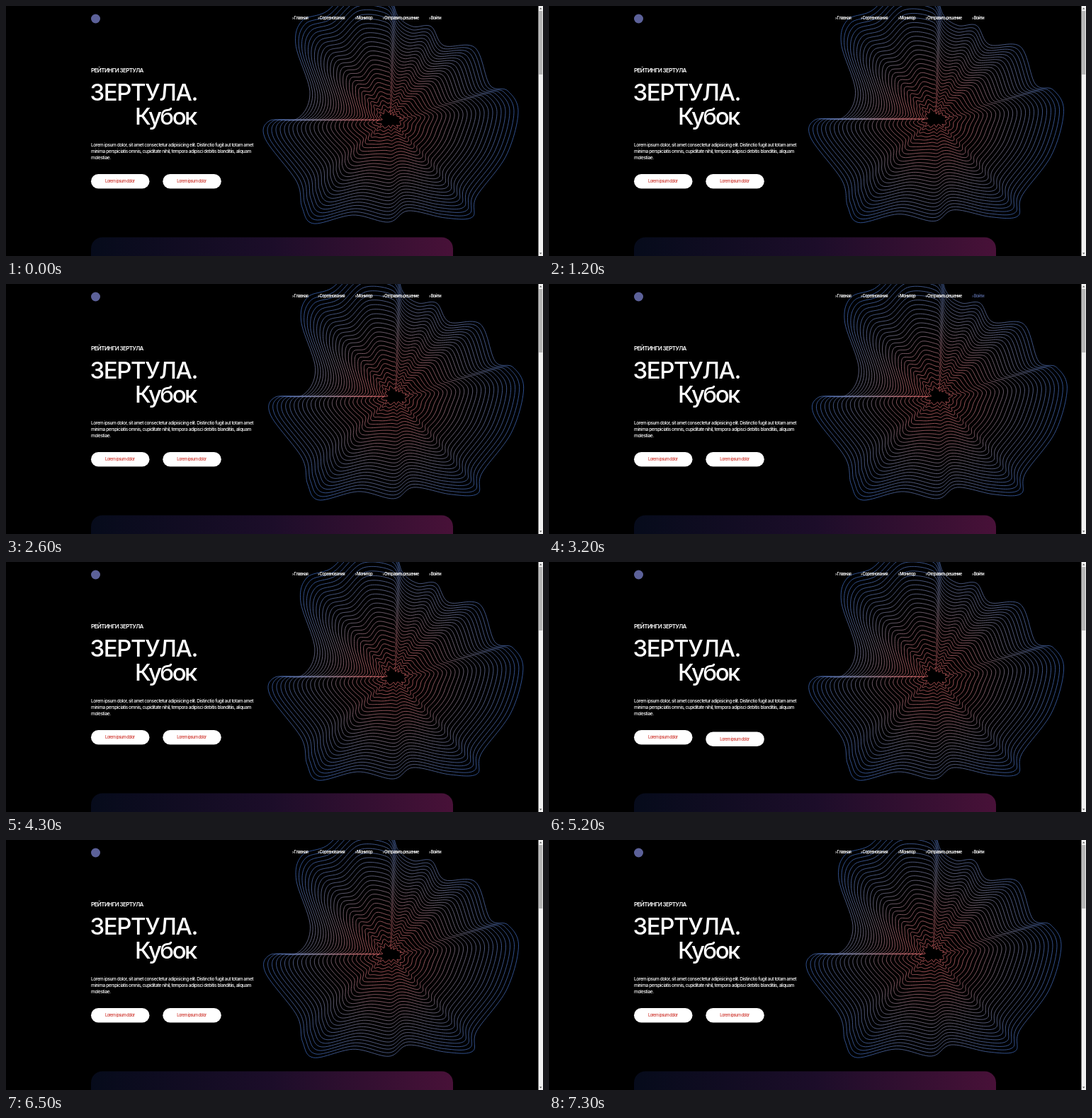
An HTML page that plays this animation: 758 px wide and 354 px high, repeating every 7.4 s.

```html
<!DOCTYPE html>
<html lang="ru">
<head>
<meta charset="utf-8">
<title>Кубок</title>
<style>
  html, body { margin: 0; width: 100%; height: 100%; overflow: hidden; background: #000; }
  svg { display: block; width: 758px; height: 354px; font-family: Inter, "Open Sans", sans-serif; fill: #fff; }
  .nav { font-size: 6px; font-weight: 600; letter-spacing: -.7px; }
  .eyebrow { font-size: 8px; font-weight: 600; letter-spacing: -.62px; }
  .title { font-size: 33px; font-weight: 500; letter-spacing: -1.4px; }
  .subtitle { font-size: 33px; font-weight: 500; letter-spacing: -2.5px; }
  .body { font-size: 6.6px; font-weight: 500; letter-spacing: -.48px; }
  .button text { font-size: 5.8px; font-weight: 500; letter-spacing: -.6px; fill: #cf362e; }
</style>
</head>
<body>
<svg viewBox="0 0 758 354" xmlns="http://www.w3.org/2000/svg">
  <defs>
    <radialGradient id="ink" gradientUnits="userSpaceOnUse" cx="541" cy="161" r="182">
      <stop offset="0" stop-color="#fb6f70"/>
      <stop offset=".28" stop-color="#c27078"/>
      <stop offset=".55" stop-color="#857c92"/>
      <stop offset=".8" stop-color="#586fa8"/>
      <stop offset="1" stop-color="#3a67bc"/>
    </radialGradient>
    <linearGradient id="card">
      <stop offset="0" stop-color="#060b1b"/>
      <stop offset=".5" stop-color="#1c0d29"/>
      <stop offset="1" stop-color="#481138"/>
    </linearGradient>
  </defs>
  <rect width="758" height="354" fill="#000"/>
  <rect x="120" y="327.5" width="511" height="60" rx="16" fill="url(#card)"/>
  <g id="blob" fill="none" stroke="url(#ink)" stroke-width=".75" stroke-linejoin="round"/>
  <circle cx="126.5" cy="18" r="6.5" fill="#5c6199"/>
  <g id="nav" class="nav"></g>
  <text class="eyebrow" x="120" y="94">РЕЙТИНГИ ЗЕРТУЛА</text>
  <text class="title" x="118.5" y="134">ЗЕРТУЛА.</text>
  <text class="subtitle" x="182" y="168">Кубок</text>
  <g class="body">
    <text x="120" y="198.5">Lorem ipsum dolor, sit amet consectetur adipisicing elit. Distinctio fugit aut totam amet</text>
    <text x="120" y="207.8">minima perspiciatis omnis, cupiditate nihil, tempora adipisci debitis blanditiis, aliquam</text>
    <text x="120" y="217.3">molestiae.</text>
  </g>
  <g id="buttons"></g>
  <rect x="751.5" width="6.5" height="354" fill="#f1f1f1"/>
  <rect x="752.2" y="7" width="5" height="90" fill="#b5b5b5"/>
  <path d="M753 4.5l1.7-2 1.7 2zM753 349.5l1.7 2 1.7-2z" fill="#505050"/>
</svg>
<script>
const LOOP = 7400, STEP = 100;
const LINES = 28, SAMPLES = 320, RIPPLES = 15;
const CENTER = [541, 161.5];
const byId = id => document.getElementById(id);
const clamp = v => Math.max(0, Math.min(1, v));
const mix = (a, b, u) => a + (b - a) * u;

function add(parent, tag, attrs, text) {
  const el = document.createElementNS('http://www.w3.org/2000/svg', tag);
  for (const key in attrs) el.setAttribute(key, attrs[key]);
  if (text) el.textContent = text;
  parent.appendChild(el);
  return el;
}

// Tips and valleys of the outer contour, clockwise from the seam on the left.
const knots = [
  [372, 162.5], [412, 159], [429, 122], [409, 55], [418, 21], [452, 8], [490, -25],
  [538, -20], [553, 14], [574, 29], [600, 29], [618, 56], [662, 59], [683, 112],
  [708, 120], [723, 150], [706, 212], [664, 270], [658, 299], [620, 300], [568, 290],
  [540, 306], [490, 296], [434, 308], [418, 285], [410, 248], [366, 188]
];

// Closed Catmull-Rom spline through the knots, s from 0 to 1.
function outlineAt(s) {
  const n = knots.length, i = Math.floor(s * n), u = s * n - i;
  const [a, b, c, d] = [-1, 0, 1, 2].map(k => knots[(i + k + n) % n]);
  return [0, 1].map(k => b[k] + u / 2 * (c[k] - a[k]
    + u * (2 * a[k] - 5 * b[k] + 4 * c[k] - d[k] + u * (3 * (b[k] - c[k]) + d[k] - a[k]))));
}

// Blend between a small rippled core (u = 0) and the outline (u = 1).
function contour(u) {
  const points = [];
  for (let j = 0; j < SAMPLES; j++) {
    const s = j / SAMPLES;
    const [dx, dy] = outlineAt(s).map((v, k) => v - CENTER[k]);
    const ripple = 2.2 * Math.sin(2 * Math.PI * RIPPLES * s) / Math.hypot(dx, dy);
    const sx = mix(.1 + ripple, 1, u), sy = mix(.07 + ripple, 1, u);
    points.push([CENTER[0] + dx * sx, CENTER[1] + dy * sy].map(v => v.toFixed(2)));
  }
  return 'M' + points.join('L') + 'Z';
}

for (let k = 0; k < LINES; k++) add(byId('blob'), 'path', { d: contour(k / (LINES - 1)) });

const links = [
  ['Главная', 404], ['Соревнования', 440], ['Монитор', 492.5],
  ['Отправить решение', 531.5], ['Войти', 597]
].map(([label, x]) => add(byId('nav'), 'text', { x, y: 19 }, '› ' + label));
const login = links[links.length - 1];

const buttons = [120, 221.3].map(x => {
  const el = add(byId('buttons'), 'g', { class: 'button' });
  add(el, 'rect', { x, y: 238, width: 82.5, height: 20.5, rx: 10.25 });
  add(el, 'text', { x: x + 20, y: 250.3 }, 'Lorem ipsum dolor');
  return { el, x };
});

// Unseen pointer that drives the parallax and the hover states.
const stops = [
  { t: 650, x: 0, y: 170 }, { t: 2000, x: 432, y: 2 }, { t: 3200, x: 606, y: 17 },
  { t: 4300, x: 500, y: 248 }, { t: 6100, x: 165, y: 250 }, { t: 6800, x: 0, y: 170 }
];

function pointerAt(t) {
  const next = stops.findIndex(p => p.t > t);
  if (next < 1) return stops[0];
  const a = stops[next - 1], b = stops[next];
  const u = Math.sin((t - a.t) / (b.t - a.t) * Math.PI / 2);
  return { x: mix(a.x, b.x, u), y: mix(a.y, b.y, u) };
}

// 0 outside the box, rising to 1 within a soft margin inside it.
function hover({ x, y }, left, top, width, height, soft) {
  const inside = Math.min(x - left, left + width - x, y - top, top + height - y);
  return clamp(inside / soft);
}

function render(t) {
  const pointer = pointerAt(t);
  const dx = pointer.x * .0138, dy = (pointer.y - 170) * .0135;
  byId('blob').setAttribute('transform', `translate(${dx} ${dy})`);
  const dim = hover(pointer, 595, 10, 22, 14, 4);
  login.setAttribute('fill', `rgb(${mix(255, 82, dim)},${mix(255, 98, dim)},${mix(255, 150, dim)})`);
  for (const { el, x } of buttons) {
    const drop = 2.6 * hover(pointer, x, 238, 82.5, 21, 8);
    el.setAttribute('transform', `translate(0 ${drop})`);
  }
}

const start = performance.now();
function tick() {
  const t = (performance.now() - start) % LOOP;
  render(Math.floor(t / STEP) * STEP);
  requestAnimationFrame(tick);
}
tick();
</script>
</body>
</html>
```
